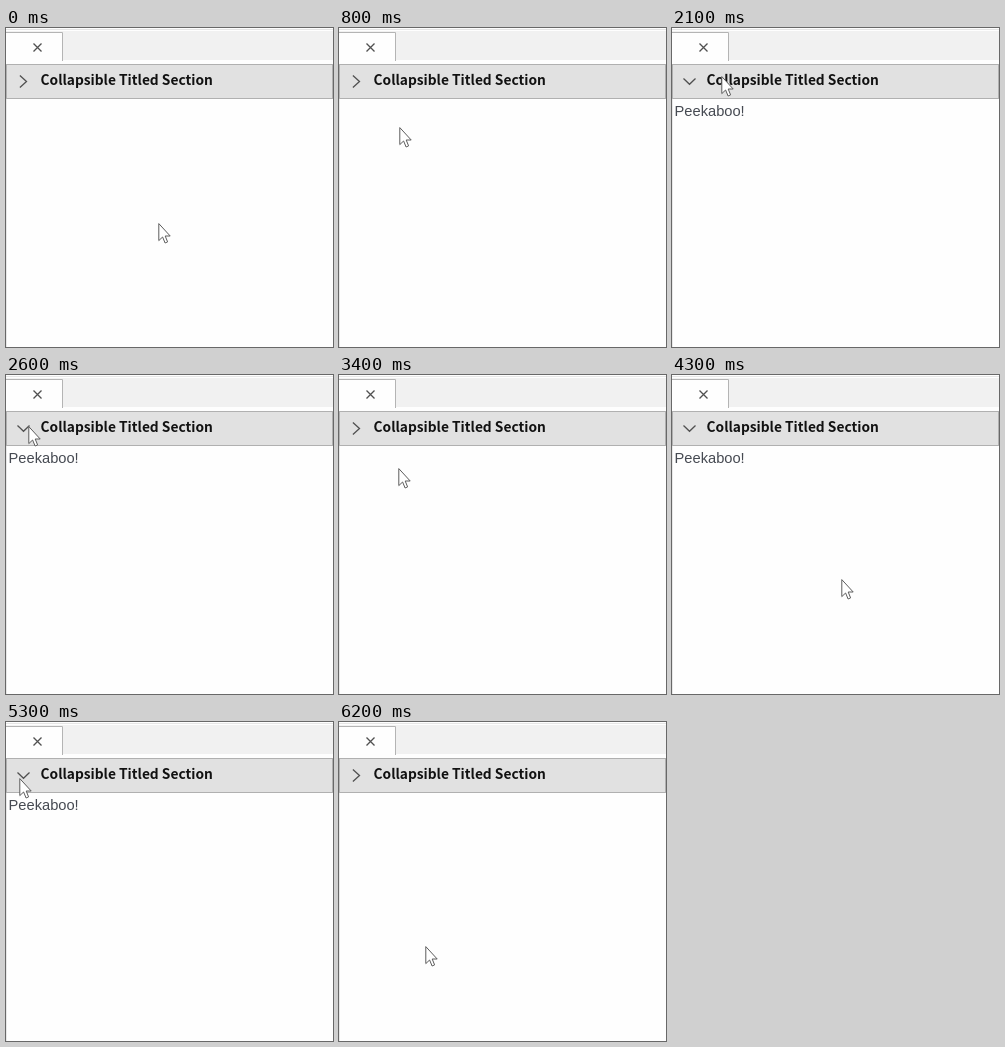
An HTML page for the animation above (6700 ms loop, 327x319 px).

```html
<!DOCTYPE html>
<html lang="en">
<head>
<meta charset="utf-8">
<title>Collapsible section</title>
<style>
  html, body { margin: 0; width: 100%; height: 100%; overflow: hidden; background: #fefefe; }
  svg { display: block; width: 327px; height: 319px; }
  .line { fill: none; stroke: #505050; stroke-width: 1.3; }
  .title { font: bold 13.75px "Noto Sans CJK SC", "Noto Sans CJK JP", sans-serif; fill: #111; }
  .body { font: 14.67px "Liberation Sans", Arial, sans-serif; fill: #464a52; }
</style>
</head>
<body>
<svg viewBox="0 0 327 319">
  <path d="M0 1.5H327" stroke="#e6e6e6"/>
  <rect y="3" width="327" height="29" fill="#f1f1f1"/>
  <path d="M0 4.5H56.5V33" fill="#fefefe" stroke="#b4b4b4"/>
  <rect y="5" width="56" height="29" fill="#fefefe"/>
  <path class="line" d="M27.5 15.5l8 8m0-8l-8 8"/>
  <path d="M.5 70V319" stroke="#e8e8e8"/>
  <rect x=".5" y="36.5" width="326" height="34" fill="#e1e1e1" stroke="#b0b0b0"/>
  <text class="title" x="34.5" y="56.5">Collapsible Titled Section</text>
  <path id="closed" class="line" d="M13.9 47.5l6.6 6-6.6 6"/>
  <g id="open">
    <path class="line" d="M11.5 50.5l6 5.8 6-5.8"/>
    <text class="body" x="2.6" y="88">Peekaboo!</text>
  </g>
  <path id="cursor" d="M.8 .6V17.6L4.6 14L7.1 20L9.6 18.9L7.2 13H12.2Z" fill="#fff" stroke="#5c5c5c"/>
</svg>
<script>
  const LOOP = 6700, STEP = 100;
  // Where the cursor rests or turns, and when
  const stops = [
    { t: 0, x: 152, y: 195 },
    { t: 1300, x: 15, y: 51 },
    { t: 1500, x: 16, y: 51 },
    { t: 1900, x: 56, y: 47 },
    { t: 2600, x: 22, y: 51 },
    { t: 2700, x: 22, y: 51 },
    { t: 3100, x: 129, y: 143 },
    { t: 3400, x: 59, y: 93 },
    { t: 3900, x: 15, y: 50 },
    { t: 4000, x: 15, y: 50 },
    { t: 4300, x: 169, y: 204 },
    { t: 5200, x: 13, y: 56 },
    { t: 5500, x: 13, y: 56 },
    { t: 6200, x: 86, y: 224 },
    { t: LOOP, x: 86, y: 224 }
  ];
  const clicks = [1300, 2700, 3900, 5400];
  const [closed, open, cursor] = ['closed', 'open', 'cursor'].map(id => document.getElementById(id));
  const show = (el, on) => el.setAttribute('visibility', on ? 'visible' : 'hidden');
  const ease = k => k * k * (3 - 2 * k);

  function cursorAt(t) {
    const i = stops.findIndex(stop => stop.t > t);
    const from = stops[i - 1], to = stops[i];
    const k = ease((t - from.t) / (to.t - from.t));
    return ['x', 'y'].map(axis => Math.round(from[axis] + (to[axis] - from[axis]) * k));
  }

  const start = performance.now();
  function draw(now) {
    const t = Math.floor(Math.max(0, now - start) % LOOP / STEP) * STEP;
    const isOpen = clicks.filter(click => click <= t).length % 2 === 1;
    show(open, isOpen);
    show(closed, !isOpen);
    cursor.setAttribute('transform', `translate(${cursorAt(t)})`);
    requestAnimationFrame(draw);
  }
  draw(start);
</script>
</body>
</html>
```
